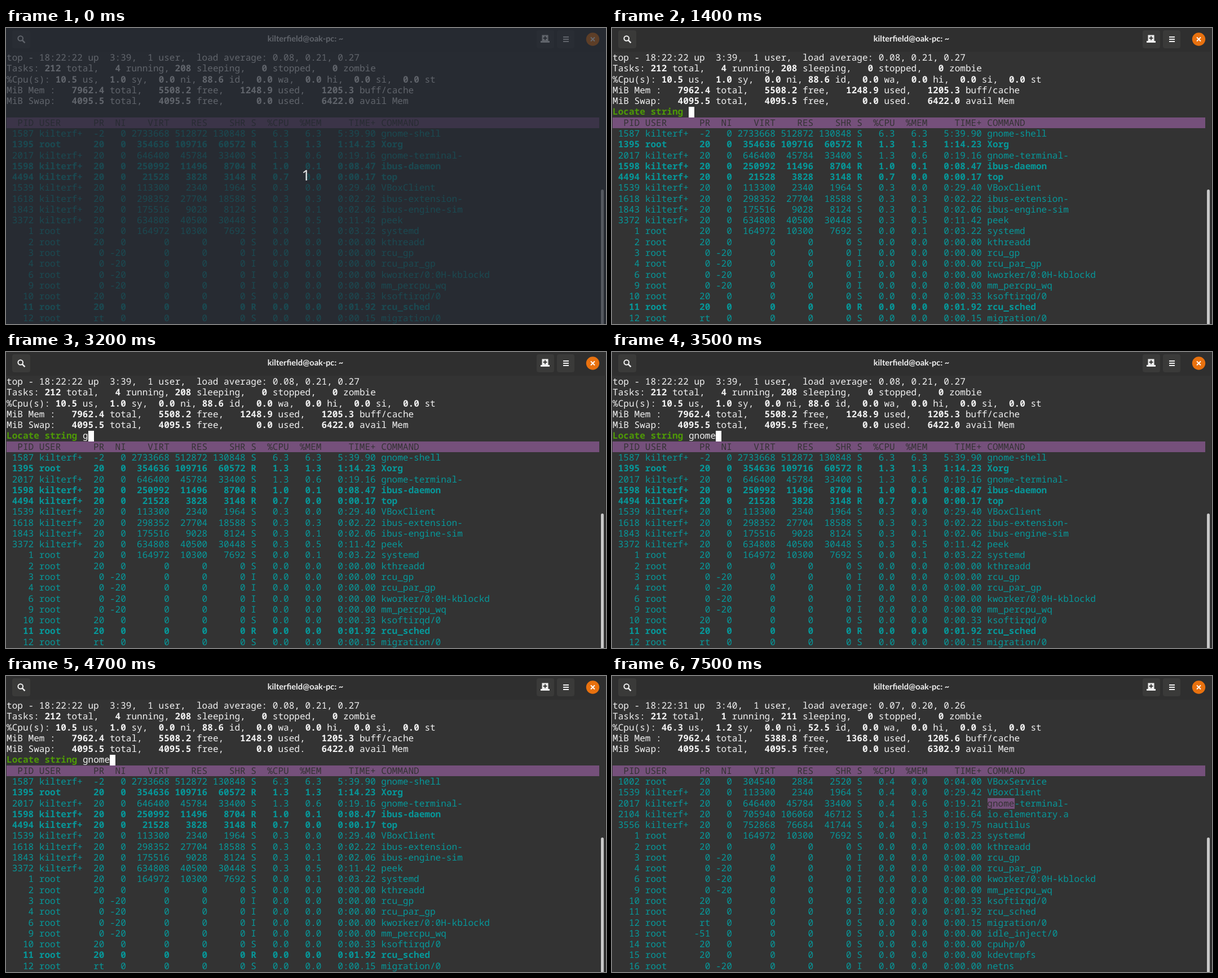
An HTML page for the animation above (8000 ms loop, 1064 by 526 pixels).

```html
<!DOCTYPE html>
<html lang="en">
<head>
<meta charset="utf-8">
<title>Terminal: locating a string in top</title>
<style>
  html, body { margin: 0; width: 100%; height: 100%; overflow: hidden; background: #333; }
  svg { display: block; width: 1064px; height: 526px; }
  text { white-space: pre; text-rendering: geometricPrecision; }
  .term { font: 16.063px "Noto Sans Mono", "DejaVu Sans Mono", monospace; fill: #f2f2f2; }
  .term .task { fill: #06989a; }
  .term .inverse { fill: #333; }
  .term .prompt { fill: #4e9a06; }
  .bold { font-weight: 700; }
  .title { font: 700 14.6px Lato, "Open Sans", sans-serif; fill: #f2f2f2; text-anchor: middle; }
  .count { font: 26px "Noto Sans", sans-serif; fill: #e9eaeb; text-anchor: middle; }
</style>
</head>
<body>
<svg viewBox="0 0 1064 526">
  <rect width="1064" height="526" fill="#333"/>
  <g id="titlebar">
    <rect width="1064" height="42" fill="#2f2f2f"/>
    <g fill="#3a3a39">
      <rect x="11" y="4" width="32" height="32" rx="4"/>
      <rect x="941" y="4" width="31" height="32" rx="4"/>
      <rect x="977" y="4" width="31" height="32" rx="4"/>
    </g>
    <g fill="none" stroke="#f2f2f2" stroke-width="2">
      <circle cx="25.7" cy="18.5" r="4.3"/>
      <path d="M29 21.8l4.5 4.5" stroke-width="2.4"/>
      <path d="M988 16h10M988 20h10M988 24h10"/>
    </g>
    <path d="M950.5 12.5h11v10.5h2.5v3h-16v-3h2.5z" fill="#f2f2f2"/>
    <path d="M956 14.5v7M952.5 18h7" stroke="#3a3a39" stroke-width="2"/>
    <circle cx="1040.5" cy="20" r="11.7" fill="#e8710f"/>
    <path d="M1037 16.5l7 7M1044 16.5l-7 7" stroke="#fff" stroke-width="1.8"/>
    <text class="title" x="531" y="24.3">kilterfield@oak-pc: ~</text>
  </g>
  <rect x="1055" y="287" width="5" height="245" rx="2.5" fill="#c9c9c9"/>
  <rect x="1063" y="42" width="1" height="484" fill="#292827"/>
  <g id="screens" class="term"></g>
  <g id="prompt" class="term"></g>
  <g id="countdown">
    <rect width="1064" height="526" fill="#232833" fill-opacity=".7"/>
    <text class="count" x="532" y="271">1</text>
  </g>
</svg>
<script>
const LOOP = 8000, CELL = 9.638, LINE = 19.27, LEFT = 1, TOP = 43.4, PURPLE = '#75507b';
const $ = id => document.getElementById(id);
const colX = col => LEFT + col * CELL;
const lineY = line => TOP + line * LINE;

const text = (line, content, cls = '', col = 0) =>
  `<text class="${cls}" x="${colX(col)}" y="${lineY(line) + 14.7}">${content}</text>`;

// Cell backgrounds sit on whole pixels
function block(line, col, cols, fill) {
  const [x, right] = [col, col + cols].map(c => Math.round(colX(c)));
  const [y, bottom] = [line, line + 1].map(l => Math.round(lineY(l)));
  return `<rect x="${x}" y="${y}" width="${right - x}" height="${bottom - y}" fill="${fill}"/>`;
}

const markBold = s => s.replace(/\*(.+?)\*/g, '<tspan class="bold">$1</tspan>');

// pid: user pr ni virt res shr command
const USER = 'kilterf+';
const processes = {
  1: 'root 20 0 164972 10300 7692 systemd',
  657: 'root 20 0 8008 3808 3512 system76-power',
  1002: 'root 20 0 304540 2884 2520 VBoxService',
  1395: 'root 20 0 354636 109716 60572 Xorg',
  1539: USER + ' 20 0 113300 2340 1964 VBoxClient',
  1587: USER + ' -2 0 2733668 512872 130848 gnome-shell',
  1598: USER + ' 20 0 250992 11496 8704 ibus-daemon',
  1618: USER + ' 20 0 298352 27704 18588 ibus-extension-',
  1843: USER + ' 20 0 175516 9028 8124 ibus-engine-sim',
  2017: USER + ' 20 0 646400 45784 33400 gnome-terminal-',
  2104: USER + ' 20 0 705940 106060 46712 io.elementary.a',
  3372: USER + ' 20 0 634808 40500 30448 peek',
  3556: USER + ' 20 0 752868 76684 41744 nautilus',
  4306: 'root 20 0 0 0 0 kworker/u2:0-events_unbound',
  4494: USER + ' 20 0 21528 3828 3148 top'
};

// Idle kernel threads: pid, priority, nice, state, time, command
const threads = [
  '2 20 0 S 0:00.00 kthreadd',
  '3 0 -20 I 0:00.00 rcu_gp',
  '4 0 -20 I 0:00.00 rcu_par_gp',
  '6 0 -20 I 0:00.00 kworker/0:0H-kblockd',
  '9 0 -20 I 0:00.00 mm_percpu_wq',
  '10 20 0 S 0:00.33 ksoftirqd/0',
  '11 20 0 I 0:01.92 rcu_sched',
  '12 rt 0 S 0:00.15 migration/0',
  '13 -51 0 S 0:00.00 idle_inject/0',
  '14 20 0 S 0:00.00 cpuhp/0',
  '15 20 0 S 0:00.00 kdevtmpfs',
  '16 0 -20 I 0:00.00 netns'
];

function formatRow(pid, user, pr, ni, virt, res, shr, state, cpu, mem, time, command) {
  const right = (s, n) => s.padStart(n);
  return right(pid, 5) + ' ' + user.padEnd(8) + right(pr, 4) + right(ni, 4) + right(virt, 8) +
    right(res, 7) + right(shr, 7) + ' ' + state + right(cpu, 6) + right(mem, 6) +
    right(time, 10) + ' ' + command;
}

function taskRow(sample) {
  const [pid, state, cpu, mem, time] = sample.split(' ');
  const info = processes[pid].split(' ');
  const command = info.pop();
  return { running: state === 'R', row: formatRow(pid, ...info, state, cpu, mem, time, command) };
}

function threadRow(thread, runningPid) {
  const [pid, pr, ni, idleState, time, command] = thread.split(' ');
  const running = pid === runningPid;
  const state = running ? 'R' : idleState;
  return { running, row: formatRow(pid, 'root', pr, ni, '0', '0', '0', state, '0.0', '0.0', time, command) };
}

const COMMAND_COL = 69;
const heading = formatRow('PID', 'USER', 'PR', 'NI', 'VIRT', 'RES', 'SHR', 'S', '%CPU', '%MEM', 'TIME+', 'COMMAND');

function drawTask({ running, row }, line, match) {
  const cls = running ? 'task bold' : 'task';
  if (!match || !row.includes(match)) return text(line, row, cls);
  const end = COMMAND_COL + match.length;
  return block(line, COMMAND_COL, match.length, PURPLE) +
    text(line, row.slice(0, COMMAND_COL) + `<tspan class="inverse">${match}</tspan>` + row.slice(end), cls);
}

function drawScreen({ clock, tasks, cpu, free, used, cache, avail, samples, runningPid, match }) {
  const summary = [
    `top - ${clock}`,
    `Tasks: *212* total,   *${tasks[0]}* running, *${tasks[1]}* sleeping,   *0* stopped,   *0* zombie`,
    `%Cpu(s): *${cpu[0]}* us,  *${cpu[1]}* sy,  *0.0* ni, *${cpu[2]}* id,  *0.0* wa,  *0.0* hi,  *0.0* si,  *0.0* st`,
    `MiB Mem :   *7962.4* total,   *${free}* free,   *${used}* used,   *${cache}* buff/cache`,
    `MiB Swap:   *4095.5* total,   *4095.5* free,      *0.0* used.   *${avail}* avail Mem`
  ];
  const rows = samples.map(taskRow)
    .concat(threads.map(t => threadRow(t, runningPid)))
    .slice(0, 18);
  return '<g>' + summary.map((s, i) => text(i, markBold(s))).join('') +
    block(6, 0, 109, PURPLE) + text(6, heading, 'inverse') +
    rows.map((r, i) => drawTask(r, i + 7, match)).join('') + '</g>';
}

const screens = [
  {
    clock: '18:22:22 up  3:39,  1 user,  load average: 0.08, 0.21, 0.27',
    tasks: ['4', '208'], cpu: ['10.5', '1.0', '88.6'],
    free: '5508.2', used: '1248.9', cache: '1205.3', avail: '6422.0', runningPid: '11',
    samples: [
      '1587 S 6.3 6.3 5:39.90', '1395 R 1.3 1.3 1:14.23', '2017 S 1.3 0.6 0:19.16',
      '1598 R 1.0 0.1 0:08.47', '4494 R 0.7 0.0 0:00.17', '1539 S 0.3 0.0 0:29.40',
      '1618 S 0.3 0.3 0:02.22', '1843 S 0.3 0.1 0:02.06', '3372 S 0.3 0.5 0:11.42',
      '1 S 0.0 0.1 0:03.22'
    ]
  },
  {
    clock: '18:22:29 up  3:40,  1 user,  load average: 0.07, 0.20, 0.26',
    tasks: ['5', '207'], cpu: ['35.0', '2.0', '63.0'],
    free: '5398.9', used: '1358.1', cache: '1205.3', avail: '6312.8', match: 'gnome',
    samples: [
      '3372 S 1.6 0.5 0:11.52', '1598 R 0.6 0.1 0:08.51', '2017 R 0.6 0.6 0:19.20',
      '1 S 0.2 0.1 0:03.23', '657 S 0.2 0.0 0:05.05', '1539 S 0.2 0.0 0:29.41',
      '1618 S 0.2 0.3 0:02.23', '1843 S 0.2 0.1 0:02.07', '4306 R 0.2 0.0 0:00.07'
    ]
  },
  {
    clock: '18:22:31 up  3:40,  1 user,  load average: 0.07, 0.20, 0.26',
    tasks: ['1', '211'], cpu: ['46.3', '1.2', '52.5'],
    free: '5388.8', used: '1368.0', cache: '1205.6', avail: '6302.9', match: 'gnome',
    samples: [
      '1002 S 0.4 0.0 0:04.00', '1539 S 0.4 0.0 0:29.42', '2017 S 0.4 0.6 0:19.21',
      '2104 S 0.4 1.3 0:16.64', '3556 S 0.4 0.9 0:19.75', '1 S 0.0 0.1 0:03.23'
    ]
  }
];

$('screens').innerHTML = screens.map(drawScreen).join('');
const PROMPT = 'Locate string ';
$('prompt').innerHTML = text(5, PROMPT, 'prompt bold') + text(5, '', '', PROMPT.length) +
  block(5, PROMPT.length, 1, '#fff');
const [, typed, cursor] = $('prompt').children;

// Each step holds until the next one
const steps = [
  { at: 0, screen: 0, countdown: true },
  { at: 200, screen: 0 },
  { at: 1400, screen: 0, input: '', cursor: true },
  { at: 2000, screen: 0, input: '' },
  { at: 2600, screen: 0, input: '', cursor: true },
  { at: 3200, screen: 0, input: 'g', cursor: true },
  { at: 3300, screen: 0, input: 'gn', cursor: true },
  { at: 3400, screen: 0, input: 'gnom', cursor: true },
  { at: 3500, screen: 0, input: 'gnome', cursor: true },
  { at: 4100, screen: 0, input: 'gnome' },
  { at: 4700, screen: 0, input: 'gnome', cursor: true },
  { at: 4800, screen: 1 },
  { at: 7500, screen: 2 }
];

const show = (el, on) => { el.style.display = on ? '' : 'none'; };
let current;

function apply(step) {
  const input = step.input ?? '';
  [...$('screens').children].forEach((el, i) => show(el, i === step.screen));
  show($('countdown'), step.countdown);
  show($('prompt'), 'input' in step);
  show(cursor, step.cursor);
  typed.textContent = input;
  cursor.setAttribute('x', Math.round(colX(PROMPT.length + input.length)));
}

function tick() {
  const time = performance.now() % LOOP;
  const step = steps.findLast(s => s.at <= time);
  if (step !== current) apply(current = step);
  requestAnimationFrame(tick);
}
tick();
</script>
</body>
</html>
```
